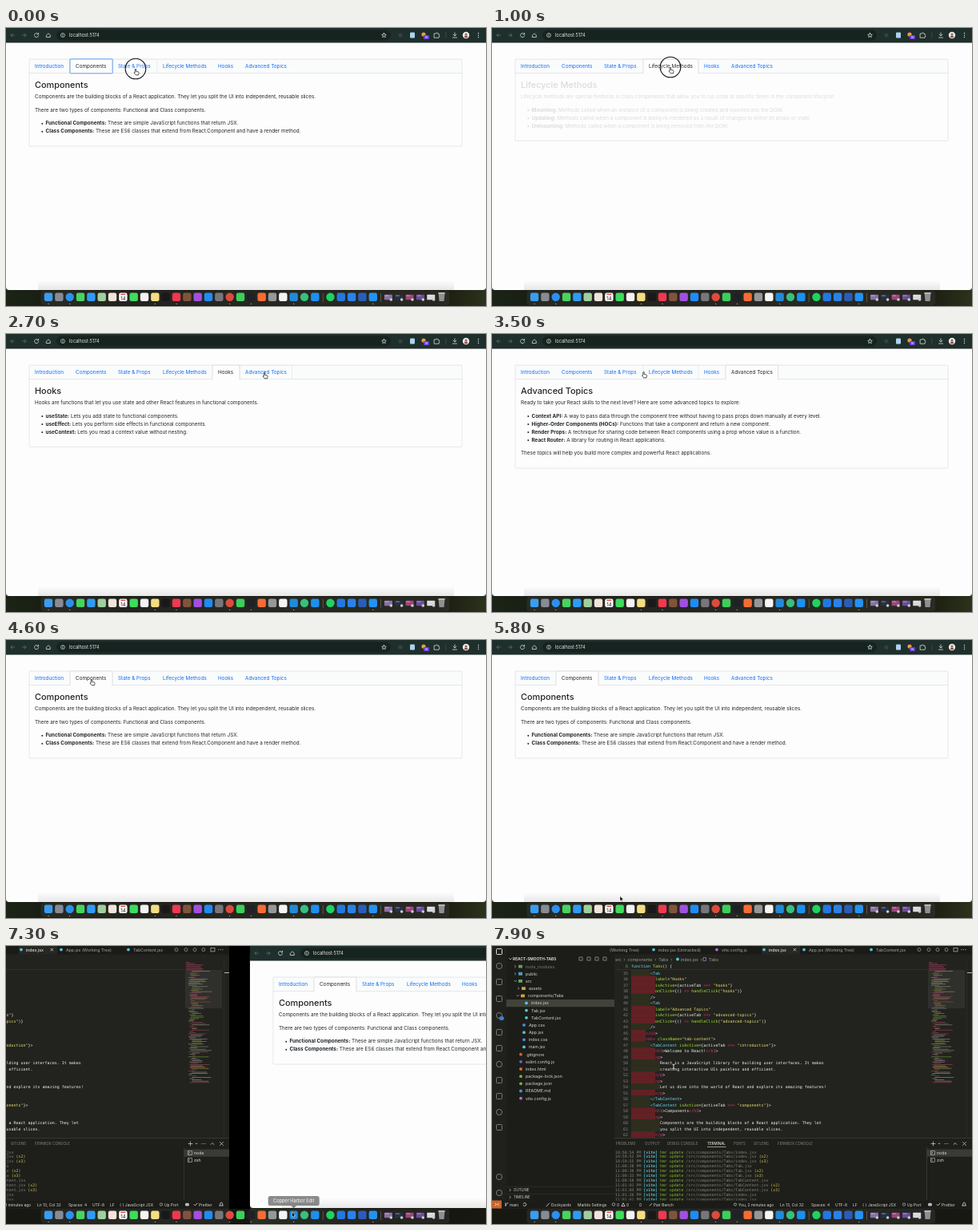
Animation of 600x348 px, one loop 8 s. Source, as an HTML page:

```html
<!DOCTYPE html>
<html lang="en">
<head>
<meta charset="utf-8">
<title>React tabs demo</title>
<style>
  html, body { margin: 0; width: 100%; height: 100%; overflow: hidden; background: #000; }
  svg { display: block; width: 600px; height: 348px; }
  text { font: 6.35px Inter, "Open Sans", sans-serif; dominant-baseline: central; white-space: pre; }
  .heading { font-size: 10.9px; font-weight: 500; }
  .url { font-size: 5.6px; }
  .ui { font-size: 5.25px; }
  .panel { font-size: 4.5px; }
  .status { font-size: 4.9px; }
  .code { font: 5px "DejaVu Sans Mono", "Liberation Mono", monospace; }
  .log { font: 4.9px "DejaVu Sans Mono", "Liberation Mono", monospace; }
  .mid { text-anchor: middle; }
  .line { fill: none; stroke-width: .8; stroke-linecap: round; stroke-linejoin: round; }
</style>
</head>
<body>
<svg id="stage" viewBox="0 0 600 348" xmlns="http://www.w3.org/2000/svg"></svg>
<script>
const LOOP = 8000;
const SPACE_GAP = 626;

const esc = s => s.replace(/&/g, '&amp;').replace(/</g, '&lt;').replace(/>/g, '&gt;');
const text = (x, y, s, attrs = '') => `<text x="${x}" y="${y}" ${attrs}>${esc(s)}</text>`;
const rect = (x, y, w, h, fill, attrs = '') =>
  `<rect x="${x}" y="${y}" width="${w}" height="${h}" fill="${fill}" ${attrs}/>`;
const circle = (x, y, r, fill, attrs = '') =>
  `<circle cx="${x}" cy="${y}" r="${r}" fill="${fill}" ${attrs}/>`;
const line = (d, stroke, attrs = '') => `<path class="line" d="${d}" stroke="${stroke}" ${attrs}/>`;

const clamp = (v, lo = 0, hi = 1) => Math.min(hi, Math.max(lo, v));
const smooth = u => u * u * (3 - 2 * u);
const ramp = (t, from, to) => smooth(clamp((t - from) / (to - from)));

function seeded(seed) {
  return () => (seed = (seed * 16807) % 2147483647) / 2147483647;
}

// ---- Tabbed page ----

const tabs = [
  { name: 'Introduction', x: 29, title: 'Welcome to React!', body: [] },
  { name: 'Components', x: 80, body: [
    'Components are the building blocks of a React application. They let you split the UI into independent, reusable slices.',
    'There are two types of components: Functional and Class components.',
    ['Functional Components:', 'These are simple JavaScript functions that return JSX.'],
    ['Class Components:', 'These are ES6 classes that extend from React.Component and have a render method.']] },
  { name: 'State & Props', x: 133, body: [
    'State and props are used to manage data and pass it between components in a React application.',
    ['State:', 'A built-in object that holds data that may change over time.'],
    ['Props:', 'Read-only values that are passed from a parent to a child component.']] },
  { name: 'Lifecycle Methods', x: 189, body: [
    'Lifecycle methods are special methods in class components that allow you to run code at specific times in the component lifecycle.',
    ['Mounting:', 'Methods called when an instance of a component is being created and inserted into the DOM.'],
    ['Updating:', 'Methods called when a component is being re-rendered as a result of changes to either its props or state.'],
    ['Unmounting:', 'Methods called when a component is being removed from the DOM.']] },
  { name: 'Hooks', x: 258, body: [
    'Hooks are functions that let you use state and other React features in functional components.',
    ['useState:', 'Lets you add state to functional components.'],
    ['useEffect:', 'Lets you perform side effects in functional components.'],
    ['useContext:', 'Lets you read a context value without nesting.']] },
  { name: 'Advanced Topics', x: 292, body: [
    'Ready to take your React skills to the next level? Here are some advanced topics to explore:',
    ['Context API:', 'A way to pass data through the component tree without having to pass props down manually at every level.'],
    ['Higher-Order Components (HOCs):', 'Functions that take a component and return a new component.'],
    ['Render Props:', 'A technique for sharing code between React components using a prop whose value is a function.'],
    ['React Router:', 'A library for routing in React applications.'],
    'These topics will help you build more complex and powerful React applications.'] }
];
const TABS_END = 357.5;
tabs.forEach((tab, i) => tab.end = i < tabs.length - 1 ? tabs[i + 1].x : TABS_END);

function tabBody(tab) {
  let y = 86, last = y, wasItem = false;
  let out = text(36, 71, tab.title || tab.name, 'class="heading"');
  tab.body.forEach((part, i) => {
    const isItem = Array.isArray(part);
    if (i) y += isItem && wasItem ? 10 : 16.7;
    out += isItem
      ? circle(45.3, y + .3, 1, '#212529') +
        `<text x="49.5" y="${y}"><tspan font-weight="700">${part[0]}</tspan> ${esc(part[1])}</text>`
      : text(36, y, part);
    wasItem = isItem;
    last = y;
  });
  tab.bottom = last + 18.6;
  return out;
}

function toolbar() {
  const ink = '#d5dedb', dim = '#62706c';
  return rect(0, 0, 600, 18.5, '#1f2f2c') + rect(63, 2.5, 418, 13, '#16231f', 'rx="6.5"') +
    line('M10.5 9H6M8 7L6 9l2 2', dim) + line('M20.5 9H25M23 7l2 2-2 2', dim) +
    line('M40.3 7.6A2.6 2.6 0 1 0 40.7 9.6M40.6 6.3v1.6H39', ink) +
    line('M50.7 9l2.3-2.3L55.3 9v2.5h-4.6z', ink) +
    circle(71, 9, 2.5, 'none', `stroke="${ink}" stroke-width=".7"`) + line('M71 8.8v1.3M71 7.7v.1', ink) +
    text(79, 9, 'localhost:5174', 'class="url" fill="#e5ebe9"') +
    line('M472.5 6.3l.8 1.8 2 .2-1.5 1.3.4 2-1.7-1-1.7 1 .4-2-1.5-1.3 2-.2z', ink) +
    circle(493, 9, 2.6, '#33443f') + rect(505, 5.5, 6, 7, '#a9d4ee', 'rx="1"') +
    circle(522, 8, 2.6, '#e89a4a') + rect(522, 9, 7, 5, '#6a3fd0', 'rx="1"') +
    text(525.5, 11.6, '16', 'class="mid" style="font-size:3.8px" fill="#fff"') +
    line('M535.5 7h2a1 1 0 0 1 2 0h1.5v2a1 1 0 0 1 0 2v1.2h-5.5z', ink) +
    rect(549.5, 5, .7, 8, '#40534e') +
    line('M561 5.8v4M559 8l2 2 2-2M558.5 12h5', ink) +
    circle(575, 9, 4.2, '#e9ecec') + circle(575, 8, 1.5, '#8a6554') + rect(573, 9.7, 4, 2.5, '#a4473f', 'rx="1"') +
    [6.5, 9, 11.5].map(y => circle(590.5, y, .7, ink)).join('');
}

const wallpaper = () => rect(0, 318, 600, 30, 'url(#ground)');

function browser() {
  const bodies = tabs.map((tab, i) => `<g id="body${i}" fill="#212529">${tabBody(tab)}</g>`).join('');
  const labels = tabs.map((tab, i) => text(tab.x + 7, 48, tab.name, `id="label${i}"`)).join('');
  return wallpaper() + '<path d="M0 10H600V324a4 4 0 0 1-4 4H4a4 4 0 0 1-4-4z" fill="#fdfdfd"/>' +
    rect(40, 316, 520, 12, 'url(#shade)') + toolbar() +
    rect(29, 39, 541, 17.5, '#fafbfb') +
    rect(29, 39, 541, 100, 'none', 'id="card" rx="1" stroke="#dee2e6" stroke-width=".8"') +
    line('M29 56.5H570', '#dee2e6') +
    rect(0, 39, 10, 17.5, 'none', 'id="hover" stroke="#e6e9ec" stroke-width=".8"') +
    '<path id="active" fill="#fdfdfd" stroke="#d5d9dd" stroke-width=".8"/>' +
    rect(79.8, 38.8, 53.5, 18, 'none', 'id="focus" rx="1.5" stroke="#93bdf5" stroke-width="1.5"') +
    labels + bodies;
}

// ---- Code editor ----

const FIRST_LINE = 35;
const source = `        <Tab
          label="Hooks"
          isActive={activeTab === "hooks"}
          onClick={() => handleClick("hooks")}
        />
        <Tab
          label="Advanced Topics"
          isActive={activeTab === "advanced-topics"}
          onClick={() => handleClick("advanced-topics")}
        />
      </ul>
      <div className="tab-content">
        <TabContent isActive={activeTab === "introduction"}>
          <h3>Welcome to React!</h3>
          <p>
            React is a JavaScript library for building user interfaces. It makes
            creating interactive UIs painless and efficient.
          </p>
          <p>
            Let us dive into the world of React and explore its amazing features!
          </p>
        </TabContent>
        <TabContent isActive={activeTab === "components"}>
          <h3>Components</h3>
          <p>
            Components are the building blocks of a React application. They let
            you split the UI into independent, reusable slices.
          </p>`.split('\n');

function tokenColor(token) {
  if (token[0] === '"') return '#e6db74';
  if (/^<\/?[a-z]|^=>|^===/.test(token)) return '#f92672';
  if (token === 'function' || /^<\/?[A-Z]/.test(token)) return '#66d9ef';
  if (/^(label|isActive|onClick|className|handleClick|Tabs)$/.test(token)) return '#a6e22e';
  return '#f0f0ea';
}

function codeLine(x, y, s) {
  const prose = !/[<>={]/.test(s);
  const tokens = prose ? [s] : s.match(/"[^"]*"|<\/?\w+|=>|===|\w+|\s+|./g);
  const spans = tokens.map(t => `<tspan fill="${tokenColor(t)}">${esc(t)}</tspan>`).join('');
  return `<text class="code" x="${x}" y="${y}">${spans}</text>`;
}

function codeArea() {
  return source.map((row, i) => {
    const y = 33.5 + i * 7.5, indent = row.search(/\S/);
    const fill = indent % 4 ? '#6e2226' : '#35361f';
    return rect(174, y - 3.75, indent * 3, 7.5, fill, indent % 4 ? 'opacity=".85"' : 'opacity=".6"') +
      text(170, y, String(FIRST_LINE + i), 'class="code" text-anchor="end" fill="#85857c"') +
      codeLine(174 + indent * 3.01, y, row.trim());
  }).join('');
}

function minimap() {
  const rnd = seeded(41), tones = ['#a33f5e', '#a39a4f', '#6f9438', '#8e8e88'];
  let out = rect(545, 30, 46, 48, '#fff', 'opacity=".06"');
  for (let y = 20; y < 171; y += 1.6) {
    const head = y < 30, x = 546 + (head ? 0 : 3 + Math.floor(rnd() * 4) * 1.5);
    out += rect(x, y, 4 + rnd() * (head ? 18 : 22), .8, tones[head ? 0 : Math.floor(rnd() * 4)], 'opacity=".75"');
  }
  return out + rect(594, 33, 6, 1, '#b9b9b0') + rect(593, 18, .5, 222, '#34352f');
}

const files = [
  [42, 'node_modules', '#6d9a52', '>'], [42, 'public', '#4f9bd0', '>'], [42, 'src', '#5fae58', 'v'],
  [46, 'assets', '#c9a03e', '>'], [45, 'components/Tabs', '#c9a03e', 'v'],
  [49, 'index.jsx', '#58c4dc'], [49, 'Tab.jsx', '#58c4dc'], [49, 'TabContent.jsx', '#58c4dc'],
  [46, 'App.css', '#4a90d9'], [46, 'App.jsx', '#58c4dc'], [46, 'index.css', '#4a90d9'], [46, 'main.jsx', '#58c4dc'],
  [42, '.gitignore', '#d9603b'], [42, 'eslint.config.js', '#6c63c7'], [42, 'index.html', '#dd6a3a'],
  [42, 'package-lock.json', '#7fae4a'], [42, 'package.json', '#7fae4a'], [42, 'README.md', '#4a90d9'],
  [42, 'vite.config.js', '#b56be0']
];

function sidebar() {
  let out = rect(0, 0, 18, 318, '#20211d') + rect(18, 0, 135, 318, '#1c1d19') + rect(18, 67, 135, 9.2, '#41433a');
  out += line('M21.5 15.5l1.5 1.5 1.5-1.5', '#ccc') +
    text(26, 16, 'REACT-SMOOTH-TABS', 'class="ui" style="font-weight:700;font-size:4.8px" fill="#d8d8d2"');
  [111, 121, 131, 141].forEach(x => out += rect(x - 2, 14, 4, 4, 'none', 'stroke="#b8b8b2" stroke-width=".6"'));
  files.forEach(([x, name, color, fold], i) => {
    const y = 25.6 + i * 9.17;
    if (fold) out += line(fold === 'v' ? `M${x - 14} ${y - .7}l1.3 1.4 1.3-1.4` : `M${x - 13.5} ${y - 1.3}l1.4 1.3-1.4 1.3`, '#aaa');
    out += (fold ? rect(x - 9, y - 1.9, 5, 3.8, color, 'rx=".6"') : circle(x - 6, y, 1.9, color)) +
      text(x, y, name, `class="ui" fill="${i ? '#d6d6cf' : '#7c7c74'}"`);
  });
  [['OUTLINE', 305.5], ['TIMELINE', 314.5]].forEach(([name, y]) => {
    out += rect(18, y - 4.6, 135, .5, '#3a3b35') + line(`M22 ${y - 1.3}l1.4 1.3-1.4 1.3`, '#bbb') +
      text(27, y, name, 'class="panel" font-weight="700" fill="#d0d0ca"');
  });
  [7, 25, 45, 66, 87, 108, 128, 148, 168, 188, 208, 227, 289, 309].forEach((y, i) => {
    const ink = i ? '#85857d' : '#f2f2ec';
    out += i % 3 === 1 || i > 11
      ? circle(9, y, 3.6, 'none', `stroke="${ink}" stroke-width=".9"`)
      : rect(5.5, y - 3.5, 7, 7, 'none', `rx="1" stroke="${ink}" stroke-width=".9"`);
  });
  return out + rect(9, 88, 6, 5, '#3d7fd0', 'rx="2.5"');
}

function editorTabs() {
  const names = [[147, '(Working Tree)', 1], [208, 'index.jsx (Untracked)'], [287, 'vite.config.js'],
    [346, 'index.jsx'], [396, 'App.jsx (Working Tree)', 1], [480, 'TabContent.jsx']];
  let out = rect(153, 0, 447, 10.5, '#1a1b17') + rect(337, 0, 48, 10.5, '#272822');
  names.forEach(([x, name, slanted], i) => {
    out += text(x, 4.6, name, `class="ui" fill="${i === 3 ? '#fff' : '#a9a9a2'}" ${slanted ? 'font-style="italic"' : ''}`);
    if (i) out += circle(x - 6, 4.6, 1.9, i === 2 ? '#b56be0' : '#58c4dc');
  });
  out += line('M377 3.2l2.8 2.8M379.8 3.2l-2.8 2.8', '#ddd');
  [534, 546, 557, 568].forEach(x => out += circle(x, 4.6, 2, 'none', 'stroke="#a5a59e" stroke-width=".7"'));
  out += rect(577, 2.4, 5, 4.5, 'none', 'stroke="#bbb" stroke-width=".7"') +
    [587, 589.5, 592].map(x => circle(x, 4.6, .6, '#bbb')).join('');
  return out + text(154, 16.5, 'src  ›  components  ›  Tabs  ›', 'class="ui" fill="#a0a098"') +
    circle(232, 16.5, 1.9, '#58c4dc') + text(236, 16.5, 'index.jsx  ›', 'class="ui" fill="#a0a098"') +
    rect(264, 14.7, 3.6, 3.6, 'none', 'stroke="#b48be0" stroke-width=".7"') + text(271, 16.5, 'Tabs', 'class="ui" fill="#a0a098"') +
    text(170, 25, '6', 'class="code" text-anchor="end" fill="#85857c"') + codeLine(174, 25, 'function Tabs() {');
}

const log = [['10:58:54', 'index', ''], ['10:59:52', 'index', ' (x2)'], ['10:59:55', 'index', ' (x3)'],
  ['11:00:28', 'Tab', ''], ['11:00:30', 'Tab', ' (x2)'], ['11:00:33', 'Tab', ' (x3)'],
  ['11:00:58', 'TabContent', ''], ['11:01:01', 'TabContent', ' (x2)'], ['11:01:03', 'TabContent', ' (x3)'],
  ['11:01:26', 'index', ''], ['11:01:41', 'index', '']];

function terminal() {
  let out = rect(153, 240.5, 447, 78, '#1e1f1a') + rect(153, 240.2, 447, .6, '#45463e');
  [[155, 'PROBLEMS'], [191, 'OUTPUT'], [219, 'DEBUG CONSOLE'], [269, 'TERMINAL'], [302, 'PORTS'],
    [327, 'GITLENS'], [357, 'FERNBOX CONSOLE']].forEach(([x, name]) =>
    out += text(x, 247.5, name, `class="panel" fill="${name === 'TERMINAL' ? '#fff' : '#86867e'}"`));
  out += rect(269, 251.3, 23.5, .7, '#d0cfa8') +
    line('M549 247.5h5M551.5 245v5M558 247l1 1 1-1M577 248.5l2-2 2 2M588.5 245.5l4 4M592.5 245.5l-4 4', '#c8c8c2') +
    [566, 568, 570].map(x => circle(x, 247.5, .5, '#c8c8c2')).join('');
  log.forEach(([time, file, count], i) => {
    out += `<text class="log" x="154" y="${257.5 + i * 5.95}"><tspan fill="#85857c">${time} PM </tspan>` +
      '<tspan fill="#54bdd0" font-weight="700">[vite]</tspan><tspan fill="#86b62e"> hmr update </tspan>' +
      `<tspan fill="#85857c">/src/components/Tabs/${file}.jsx</tspan><tspan fill="#d2c653">${count}</tspan></text>`;
  });
  out += rect(543, 252, .6, 66, '#45463e') + rect(544, 254.5, 56, 9.2, '#3a3b34');
  [['node', 259], ['zsh', 268]].forEach(([name, y]) => out +=
    rect(548.5, y - 2.3, 5, 4.6, 'none', 'stroke="#ccc" stroke-width=".6"') + line(`M549.7 ${y - 1}l1 1-1 1`, '#ccc') +
    text(556, y, name, 'class="ui" fill="#ddd"'));
  return out;
}

function statusBar() {
  const items = [[22, 'main'], [74, 'Dockyards'], [107, 'Marble Settings'], [156, '0'], [168, '0'], [184, '0'],
    [202, 'Pair Bench'], [308, 'You, 2 minutes ago'], [360, 'Ln 13, Col 32'], [399, 'Spaces: 4'], [429, 'UTF-8'],
    [451, 'LF'], [463, '{ } JavaScript JSX'], [519, 'Up Port'], [562, 'Prettier']];
  const dot = (x, r) => circle(x, 323.5, r, 'none', 'stroke="#ddd" stroke-width=".6"');
  return rect(0, 318.5, 600, 10, '#1b1c18') + rect(0, 318.5, 12, 10, '#c8652a') +
    line('M4 322l1.5 1.5-1.5 1.5M8.5 322l-1.5 1.5 1.5 1.5', '#fff') +
    line('M17 321.5v4M20 321.5c0 2-3 1-3 3', '#ddd') + line('M39 322.5a2 2 0 1 1 0 2', '#ddd') +
    line('M68 326l3.5-4M162 325.3l2-3.6 2 3.6zM197 325l3-2.5', '#ddd') +
    dot(152, 1.8) + dot(304, 1.6) + dot(515, 1.7) +
    rect(545, 321.8, 5, 3.6, '#bbb', 'rx="1.5"') + line('M556 323.5l1.5 1.5 2.5-3', '#ddd') +
    line('M588 325h4.5l-.8-1v-1.3a1.5 1.5 0 0 0-3 0v1.3z', '#ddd') +
    items.map(([x, s]) => text(x, 323.6, s, 'class="status" fill="#dcdcd5"')).join('');
}

const editor = () => rect(0, 0, 600, 329, '#22231e') + codeArea() + rect(153, 10.5, 447, 18.5, '#22231e') +
  rect(153, 29, 392, .5, '#3a3b34') + minimap() + sidebar() + editorTabs() + terminal() + statusBar();

// ---- Dock ----

const PITCH = 13.33, SEPARATOR = 5.8, DOCK_LEFT = 46.4;
const dockColors = ('#3a9df0 #878b95 @#2d8fee #47d45f #2f9bf5 #9fcf9d #f1e4da day #3edb5c #f3f3f3 #f6dd82 #191919 ' +
  '#f0384f #80543a #a24fe0 #1f8bf5 #77777b @#dd4b3e #3ccf5a #202124 #f76b35 #94989a #f5f5f5 #2389d8 ' +
  '@#36c07b #1d8ff0 | @#1ed35f #2378e0 #2a82e8 #2a5db8 #2492f0 | thumb:#8a6fa8 thumb:#26304a thumb:#a0437d ' +
  'thumb:#6c4ca0 thumb:#d8d9de bin').split(' ');
const RUNNING = [0, 2, 10, 12, 17, 19, 23, 30];

function dockIcon(kind) {
  if (kind === 'day') return rect(-5.2, -10.4, 10.4, 10.4, '#fafafa', 'rx="2.3"') + rect(-3, -9.3, 6, 1.4, '#ec4b42') +
    text(0, -4, '14', 'class="mid" style="font-size:6px" fill="#222"');
  if (kind === 'bin') return '<path d="M-4-10.5H4L3 0H-3z" fill="#9ea3a6" opacity=".85"/>' + rect(-4.2, -10.8, 8.4, 1.4, '#d5d9da', 'rx=".7"');
  if (kind.startsWith('thumb')) return rect(-5, -8.2, 10, 6.4, kind.slice(6), 'rx=".6"') + rect(-4.3, -7.4, 5, 1, '#fff', 'opacity=".45"') +
    circle(3.4, -2, 1.8, '#c9ccd2');
  return kind[0] === '@' ? circle(0, -5.2, 5.2, kind.slice(1)) : rect(-5.2, -10.4, 10.4, 10.4, kind, 'rx="2.3"');
}

const apps = [];
let slot = DOCK_LEFT;
dockColors.forEach(kind => {
  if (kind === '|') { slot += SEPARATOR; apps[apps.length - 1].gapAfter = true; return; }
  apps.push({ kind, home: slot + PITCH / 2 });
  slot += PITCH;
});
const TARGET_APP = 23;

function dock() {
  return rect(0, 329, 10, 18, '#4a4b45', 'id="tray" rx="4" opacity=".3"') +
    apps.map((app, i) => `<g id="app${i}">${dockIcon(app.kind)}</g>` +
      (app.gapAfter ? rect(0, 332, .6, 11, '#77776f', `id="sep${i}"`) : '')).join('') +
    RUNNING.map(i => circle(0, 345.3, .6, '#d5d5d0', `id="dot${i}"`)).join('') +
    '<g id="tip">' + rect(-32, -20.5, 64, 12, '#484848', 'rx="2.5"') + '<path d="M-3.5-8.6H3.5L0-5z" fill="#484848"/>' +
    text(0, -14.5, 'Copper Harbor Edit', 'class="mid url" fill="#fff"') + '</g>';
}

// ---- Scene ----

const stage = document.getElementById('stage');
stage.innerHTML = `<defs>
    <linearGradient id="ground"><stop stop-color="#1b2416"/><stop offset=".25" stop-color="#14130f"/>
      <stop offset=".6" stop-color="#191b12"/><stop offset=".9" stop-color="#1a1a10"/><stop offset="1" stop-color="#2c331c"/></linearGradient>
    <linearGradient id="shade" x2="0" y2="1"><stop stop-color="#999" stop-opacity="0"/><stop offset="1" stop-color="#999" stop-opacity=".22"/></linearGradient>
  </defs>
  <g id="browser">${browser()}</g>
  <g id="editor">${rect(0, 318, 600, 30, '#171812')}${editor()}</g>
  ${dock()}
  <circle id="ring" r="12.8" fill="#fff" fill-opacity=".1" stroke="#111" stroke-width="1.1"/>
  <path id="arrow" d="M0 0v6.2l1.4-1.2.9 2.1 1-.4-.9-2.1h1.9z" fill="#000" stroke="#fff" stroke-width=".5"/>
  <path id="hand" d="M-.7.7Q0-.2.7.7v2.6l2.7.7q.9.3.7 1.5L3.5 7.8H.2L-1.8 5.2q-.3-1 1.1-.5z" fill="#fff" stroke="#111" stroke-width=".7"/>
  <path id="beam" class="line" d="M-1.3-3q1.3 0 1.3 1V2q0 1-1.3 1M1.3-3q-1.3 0-1.3 1M0 2q0 1 1.3 1" stroke="#fff"/>`;

const el = {};
stage.querySelectorAll('[id]').forEach(node => el[node.id] = node);
const show = (node, on) => node.setAttribute('display', on ? 'inline' : 'none');
const move = (node, x, y = 0, s = 1) => node.setAttribute('transform', `translate(${x} ${y}) scale(${s})`);

// Each click selects a tab at the given time.
const clicks = [[-900, 1], [100, 2], [1000, 3], [2100, 4], [2900, 5], [4100, 1]];
const cursorPath = [[0, 162, 51], [150, 162, 51], [800, 223, 49], [1300, 223, 49], [1850, 280, 47], [2200, 280, 47],
  [2750, 324, 48], [3150, 324, 48], [3500, 189.5, 47], [3900, 107, 48], [4800, 107, 49], [5700, 160, 320.5],
  [5850, 160, 320.5], [6050, 172, 335], [6650, 357.5, 333], [7400, 357.5, 333], [7850, 227, 151], [8000, 227, 151]];

function cursorAt(t) {
  const i = cursorPath.findIndex(key => key[0] > t);
  const [t0, x0, y0] = cursorPath[i - 1], [t1, x1, y1] = cursorPath[i];
  const u = ramp(t, t0, t1);
  return [x0 + (x1 - x0) * u, y0 + (y1 - y0) * u];
}

function drawPage(t, x, y) {
  const [since, active] = clicks.filter(click => click[0] <= t).pop();
  const tab = tabs[active];
  tabs.forEach((other, i) => {
    show(el['body' + i], i === active);
    el['label' + i].setAttribute('fill', i === active ? '#212529' : '#0d6efd');
  });
  el['body' + active].setAttribute('opacity', ramp(t, since - 80, since + 250));
  el.card.setAttribute('height', tab.bottom - 39);
  el.active.setAttribute('d', `M${tab.x} 57V40q0-1 1-1H${tab.end - 1}q1 0 1 1V57`);
  show(el.focus, t < 100);

  const hovered = y > 39 && y < 57 && tabs.find(other => x >= other.x && x < other.end);
  show(el.hover, hovered && hovered !== tab);
  if (hovered) {
    el.hover.setAttribute('x', hovered.x);
    el.hover.setAttribute('width', hovered.end - hovered.x);
  }
  return Boolean(hovered);
}

function drawDock(t, x) {
  const swell = ramp(t, 5900, 6100) * (1 - ramp(t, 6950, 7150));
  const scales = apps.map(app => 1 + .85 * swell * Math.exp(-(((app.home - x) / 29) ** 2)));
  const extra = scales.reduce((sum, s) => sum + (s - 1) * PITCH, 0);
  const left = DOCK_LEFT - extra / 2;
  let edge = left;
  apps.forEach((app, i) => {
    const center = edge + scales[i] * PITCH / 2;
    move(el['app' + i], center, 342, scales[i]);
    if (RUNNING.includes(i)) el['dot' + i].setAttribute('cx', center);
    if (i === TARGET_APP) move(el.tip, center, 342 - 10.4 * scales[i] + 1.8);
    edge += scales[i] * PITCH;
    if (app.gapAfter) {
      el['sep' + i].setAttribute('x', edge + SEPARATOR / 2);
      edge += SEPARATOR;
    }
  });
  el.tray.setAttribute('x', left - 3);
  el.tray.setAttribute('width', edge - left + 6);
  show(el.tip, t > 6550 && t < 7450);
  el.tip.setAttribute('opacity', 1 - .75 * ramp(t, 7100, 7500));
}

function draw(t) {
  const [x, y] = cursorAt(t);
  const slide = SPACE_GAP * ramp(t, 6957, 7657);
  move(el.browser, slide);
  move(el.editor, slide - SPACE_GAP);

  const overTab = drawPage(t, x, y) && t < 5000;
  drawDock(t, x);

  const pressed = clicks.some(([at]) => t >= at - 120 && t < at + 80) || (t >= 6850 && t < 6960);
  show(el.ring, pressed);
  move(el.ring, x, y);
  const shape = overTab ? 'hand' : t > 7600 ? 'beam' : 'arrow';
  ['hand', 'beam', 'arrow'].forEach(name => {
    show(el[name], name === shape);
    move(el[name], x, y);
  });
}

const start = performance.now();
function tick() {
  draw((performance.now() - start) % LOOP);
  requestAnimationFrame(tick);
}
tick();
</script>
</body>
</html>
```
